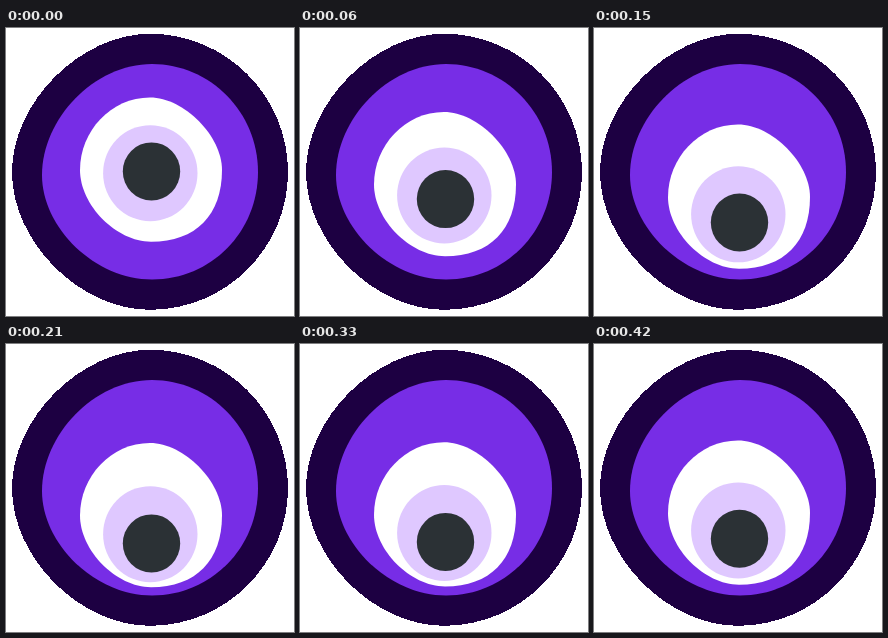
An HTML page without scripts that plays this animation: 288 px wide and 288 px high, repeating every 0.45 s.

```html
<!DOCTYPE html>
<html lang="en">
<head>
<meta charset="utf-8">
<title>Eye looking down</title>
<style>
  @property --drop {
    syntax: "<number>";
    inherits: true;
    initial-value: 0;
  }
  html, body {
    margin: 0;
    width: 100%;
    height: 100%;
    overflow: hidden;
    background: #fff;
  }
  svg { display: block; width: 100vw; height: 100vh; }
  .rim { fill: #1d0042; shape-rendering: crispEdges; }
  .ring { fill: #772de6; }
  .soft { filter: blur(.6px); }

  /* One shared drop; inner layers travel farther for parallax. */
  .eye { animation: look 450ms step-end infinite; }
  .eye > * { transform: translateY(calc(var(--drop) * var(--reach))); }
  .white { --reach: 29.5px; fill: #fff; }
  .iris { --reach: 45px; fill: #dfc8ff; }
  .pupil { --reach: 56px; fill: #2b3135; }

  /* Quadratic ease-out down, then a slow accelerating return. */
  @keyframes look {
    0% { --drop: 0; }
    6.66% { --drop: .272; }
    13.33% { --drop: .495; }
    20% { --drop: .677; }
    26.66% { --drop: .818; }
    33.33% { --drop: .913; }
    40% { --drop: .975; }
    46.66% { --drop: 1; }
    53.33% { --drop: .999; }
    60% { --drop: .994; }
    66.66% { --drop: .985; }
    73.33% { --drop: .973; }
    80% { --drop: .957; }
    86.66% { --drop: .938; }
    93.33%, 100% { --drop: .917; }
  }
</style>
</head>
<body>
<svg viewBox="0 0 288 288">
  <path class="rim" d="M144 5.800C220 5.800 282 68 282 144S220 281.800 144 281.800C74 281.800 6 214 6 144S75 5.800 144 5.800Z"/>
  <g class="soft">
    <path class="ring" d="M146 36C204 36 252 84 252 144S205 251.500 146 251.500C89 251.500 36 200 36 147C36 91 88 36 146 36Z"/>
    <g class="eye">
      <path class="white" d="M144 69.500C178 69.500 216 108 216 142C216 187 190 213.700 145 213.700C110 213.700 74 177 74 142C74 103 105 69.500 144 69.500Z"/>
      <ellipse class="iris" cx="144.300" cy="145.200" rx="47.200" ry="48"/>
      <ellipse class="pupil" cx="145.500" cy="143.400" rx="28.700" ry="29"/>
    </g>
  </g>
</svg>
</body>
</html>
```
